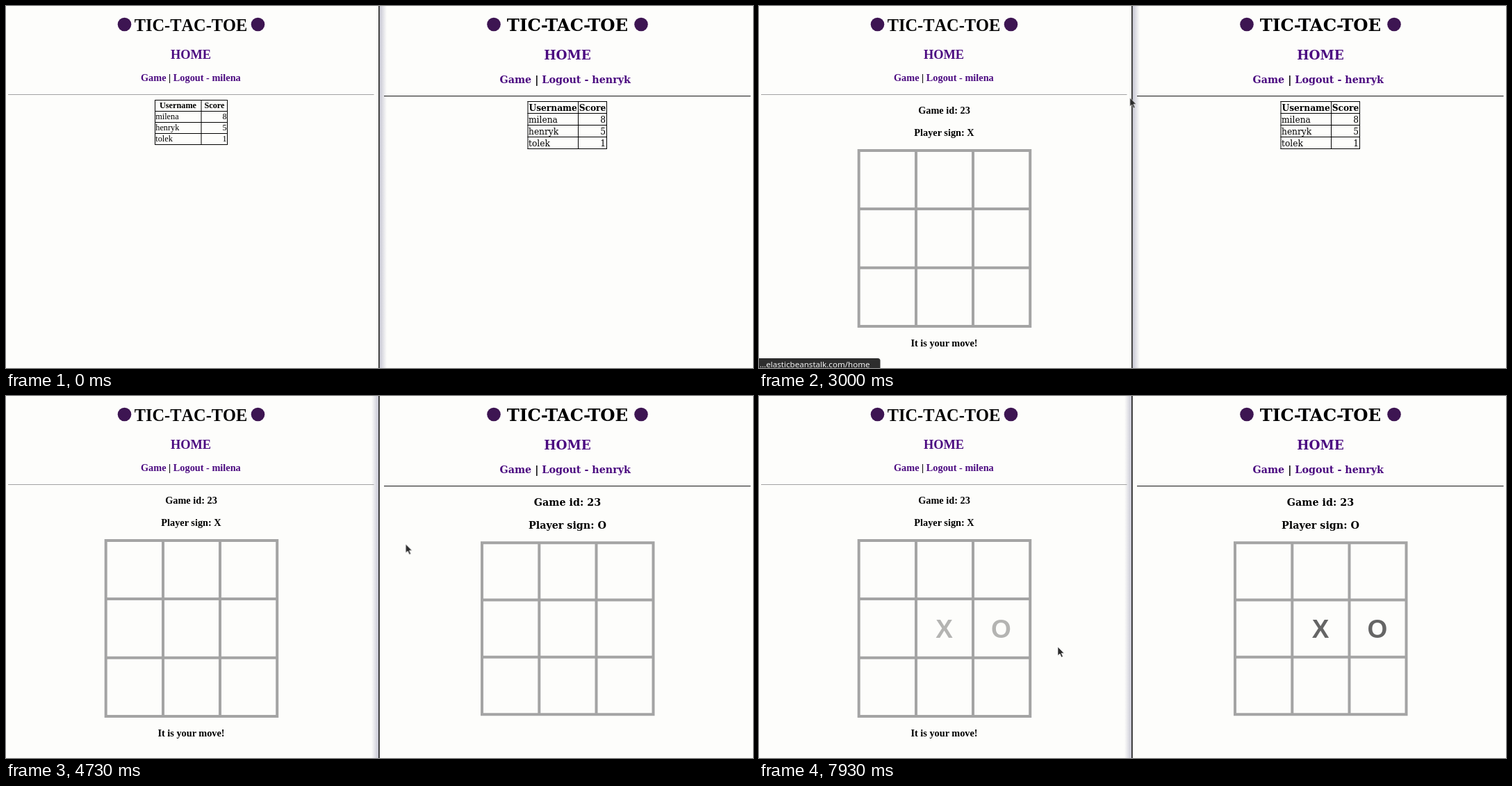
An HTML page for the animation above (8 s loop, 1075 px wide and 521 px high).

```html
<!DOCTYPE html>
<html lang="en">
<head>
<meta charset="utf-8">
<title>Tic-tac-toe</title>
<style>
html, body { margin: 0; width: 100%; height: 100%; overflow: hidden; background: #fdfdfb; }
svg { display: block; width: 100%; height: 100%; }
text { font-size: 12.24px; fill: #000; }
.left { font-family: "Liberation Serif", "Times New Roman", serif; }
.right { font-family: "DejaVu Serif", serif; }
.left .h1 { font-kerning: none; }
.h1, .h2, .h3, .th { font-weight: 700; }
.h1 { font-size: 24.4px; }
.h2 { font-size: 18.35px; }
.h3 { font-size: 14.3px; }
.h1, .h2, .mid { text-anchor: middle; }
.end { text-anchor: end; }
.link { fill: #4b0a80; }
.badge { fill: #3d1552; }
.table { fill: none; stroke: #000; stroke-width: 1; }
.board { fill: none; stroke: #a4a4a4; stroke-width: 4; }
.mark { font: 700 37px "Liberation Sans", Arial, sans-serif; text-anchor: middle; }
.left .mark { fill: #b4b4b2; }
.right .mark { fill: #656565; }
.bar { fill: #2d2d2d; }
.url { font-family: "Noto Sans", "Open Sans", sans-serif; font-size: 11px; fill: #f0f0f0; }
.url.wide { font-size: 11.6px; }

/* hard switches */
.lobbyL, .gameL, .lobbyR, .gameR, .x, .o, .turnL, .turnR, .frontL, .frontR,
.statL, .toGame, .toHome, .statR, .arrow, .beam, .hand {
  animation: 8s step-end infinite;
}
.lobbyL { animation-name: lobbyL; }
.gameL { animation-name: gameL; }
.lobbyR { animation-name: lobbyR; }
.gameR { animation-name: gameR; }
.x { animation-name: x; }
.o { animation-name: o; }
.turnL { animation-name: turnL; }
.turnR { animation-name: turnR; }
.frontL { animation-name: frontL; }
.frontR { animation-name: frontR; }
.statL { animation-name: statL; }
.toGame { animation-name: toGame; }
.toHome { animation-name: toHome; }
.statR { animation-name: statR; }
.arrow { animation-name: arrow; }
.beam { animation-name: beam; }
.hand { animation-name: hand; }
@keyframes lobbyL { 0% { opacity: 1 } 29.625%, 100% { opacity: 0 } }
@keyframes gameL { 0% { opacity: 0 } 29.625%, 100% { opacity: 1 } }
@keyframes lobbyR { 0% { opacity: 1 } 53.375%, 100% { opacity: 0 } }
@keyframes gameR { 0% { opacity: 0 } 53.375%, 100% { opacity: 1 } }
@keyframes x { 0% { opacity: 0 } 72.875%, 100% { opacity: 1 } }
@keyframes o { 0% { opacity: 0 } 90.375%, 100% { opacity: 1 } }
@keyframes turnL { 0% { opacity: 1 } 72.875% { opacity: 0 } 90.375%, 100% { opacity: 1 } }
@keyframes turnR { 0% { opacity: 0 } 72.875% { opacity: 1 } 90.375%, 100% { opacity: 0 } }
@keyframes frontL { 0%, 69.625% { opacity: 1 } 48.75%, 87.125%, 100% { opacity: 0 } }
@keyframes frontR { 0%, 69.625% { opacity: 0 } 48.75%, 87.125%, 100% { opacity: 1 } }
@keyframes statL { 0% { opacity: 0 } 22.375% { opacity: 1 } 39.125%, 100% { opacity: 0 } }
@keyframes toGame { 0% { opacity: 1 } 34.25%, 100% { opacity: 0 } }
@keyframes toHome { 0% { opacity: 0 } 34.25%, 100% { opacity: 1 } }
@keyframes statR { 0% { opacity: 0 } 46.25% { opacity: 1 } 56%, 100% { opacity: 0 } }
@keyframes arrow {
  0%, 12.25%, 22%, 46.125% { opacity: 0 }
  .375%, 13.5%, 35%, 55.25%, 100% { opacity: 1 }
}
@keyframes beam { 0% { opacity: 0 } 12.25% { opacity: 1 } 13.5%, 100% { opacity: 0 } }
@keyframes hand {
  0%, 35%, 55.25%, 100% { opacity: 0 }
  22%, 46.125% { opacity: 1 }
}

/* pointer path */
.pointer { animation: path 8s linear infinite; }
@keyframes path {
  0%, .375% { transform: translate(322px, 515px) }
  5.375% { transform: translate(305px, 395px) }
  10.375% { transform: translate(268px, 245px) }
  12.875% { transform: translate(247px, 139px) }
  20.875% { transform: translate(222px, 119px) }
  22.375%, 32% { transform: translate(218px, 104px) }
  34.75% { transform: translate(335px, 118px) }
  37.5% { transform: translate(533px, 132px) }
  39.625% { transform: translate(655px, 137px) }
  41.25% { transform: translate(712px, 128px) }
  46.125%, 55% { transform: translate(731px, 105px) }
  58.75% { transform: translate(600px, 200px) }
  61.25% { transform: translate(440px, 285px) }
  63.375% { transform: translate(333px, 313px) }
  65.625% { transform: translate(290px, 322px) }
  67.875%, 73.5% { transform: translate(274px, 326px) }
  76.25% { transform: translate(480px, 345px) }
  79.625% { transform: translate(861px, 352px) }
  82.5% { transform: translate(890px, 338px) }
  88.75%, 90.375% { transform: translate(896px, 335px) }
  92.5% { transform: translate(780px, 340px) }
  95%, 99.124% { transform: translate(581px, 347px) }
  99.125%, 100% { transform: translate(430px, 361px) }
}
</style>
</head>
<body>
<svg viewBox="0 0 1075 521" preserveAspectRatio="none">
  <defs>
    <linearGradient id="shade">
      <stop offset="0" stop-color="#c8c8d4"/>
      <stop offset="1" stop-color="#fdfdfb"/>
    </linearGradient>
  </defs>
  <rect width="1075" height="521" fill="#fdfdfb"/>

  <!-- window edge -->
  <rect class="frontL" x="538" width="10" height="521" fill="url(#shade)"/>
  <rect class="frontR" x="-536" width="10" height="521" fill="url(#shade)" transform="scale(-1 1)"/>
  <rect x="536" width="1.7" height="521" fill="#222"/>

  <g class="left">
    <circle class="badge" cx="170.5" cy="26.5" r="9.8"/>
    <circle class="badge" cx="362.5" cy="26.5" r="9.8"/>
    <text class="h1" x="266" y="36">TIC-TAC-TOE</text>
    <text class="h2 link" x="266" y="76">HOME</text>
    <text class="h3" x="194" y="108"><tspan class="link">Game</tspan> | <tspan class="link">Logout - milena</tspan></text>
    <rect x="3" y="127" width="526.5" height="1" fill="#a2a2a2"/>

    <g class="lobbyL">
      <path class="table" d="M214 135.5H319M214 151.5H319M214 167.5H319M214 183.5H319M214 199.5H319M214.5 135V200M281 135V200M318.5 135V200"/>
      <text class="th mid" x="247.5" y="147">Username</text>
      <text class="th mid" x="300" y="147">Score</text>
      <text x="215.3" y="163">milena</text><text class="end" x="317.5" y="163">8</text>
      <text x="215.3" y="179">henryk</text><text class="end" x="317.5" y="179">5</text>
      <text x="215.3" y="195">tolek</text><text class="end" x="317.5" y="195">1</text>
    </g>

    <g class="gameL">
      <text class="h3 mid" x="266.5" y="155">Game id: 23</text>
      <text class="h3 mid" x="266.5" y="187">Player sign: X</text>
      <path class="board" d="M143.7 208H390.2V461H143.7ZM226 208V461M308 208V461M144 292H390M144 376.7H390"/>
      <text class="mark x" x="266.5" y="347.5">X</text>
      <text class="mark o" x="348.5" y="347.5">O</text>
      <text class="h3 mid turnL" x="266.5" y="490">It is your move!</text>
    </g>
  </g>

  <g class="right">
    <circle class="badge" cx="702" cy="26.5" r="9.8"/>
    <circle class="badge" cx="914" cy="26.5" r="9.8"/>
    <text class="h1" x="808" y="36">TIC-TAC-TOE</text>
    <text class="h2 link" x="808" y="77">HOME</text>
    <text class="h3" x="710.5" y="111"><tspan class="link">Game</tspan> | <tspan class="link">Logout - henryk</tspan></text>
    <rect x="544" y="129" width="527.5" height="1.2" fill="#333"/>

    <g class="lobbyR">
      <path class="table" d="M750.5 137.5H865M750.5 154.5H865M750.5 171.5H865M750.5 188.5H865M750.5 205.5H865M751 137V206M823.5 137V206M864.5 137V206"/>
      <text class="th mid" x="787.2" y="151">Username</text>
      <text class="th mid" x="844" y="151">Score</text>
      <text x="752" y="168">milena</text><text class="end" x="863" y="168">8</text>
      <text x="752" y="185">henryk</text><text class="end" x="863" y="185">5</text>
      <text x="752" y="202">tolek</text><text class="end" x="863" y="202">1</text>
    </g>

    <g class="gameR">
      <text class="h3 mid" x="808" y="158">Game id: 23</text>
      <text class="h3 mid" x="808" y="190.5">Player sign: O</text>
      <path class="board" d="M685 211.3H931.5V458.2H685ZM767.3 211V458M849.5 211V458M685 293.5H931M685 375.8H931"/>
      <text class="mark x" x="808" y="348">X</text>
      <text class="mark o" x="890" y="348">O</text>
      <text class="h3 mid turnR" x="808" y="488">It is your move!</text>
    </g>
  </g>

  <!-- link previews -->
  <g class="statL">
    <path class="bar" d="M0 507H171Q174.5 507 174.5 510.5V521H0Z"/>
    <text class="url wide toGame" x="1" y="519.7">…elasticbeanstalk.com/game</text>
    <text class="url wide toHome" x="1" y="519.7">…elasticbeanstalk.com/home</text>
  </g>
  <g class="statR">
    <path class="bar" d="M537.5 507H827Q830.5 507 830.5 510.5V521H537.5Z"/>
    <text class="url" x="541" y="520">tictactoe-pkoraves.us-east-1.elasticbeanstalk.com/game</text>
  </g>

  <g class="pointer">
    <path class="arrow" d="M0 0V12.5L3 10L5.2 15L7.4 14L5.2 9.2H9Z" fill="#2b2b2b" stroke="#fff" stroke-width=".6"/>
    <path class="beam" d="M-2.5 -6.5Q0 -6.5 0 -5Q0 -6.5 2.5 -6.5M0 -5V5.5M-2.5 7Q0 7 0 5.5Q0 7 2.5 7" fill="none" stroke="#333"/>
    <path class="hand" d="M-1.2 .8Q0 -.8 1.4 .8L2.2 4L7 4.8Q8.4 5.2 8.2 7L7.6 13H.8L-2.8 8.2Q-2.4 6.6 .2 7.6Z" fill="#2e2e2e" stroke="#fff" stroke-width=".5"/>
  </g>
</svg>
</body>
</html>
```
